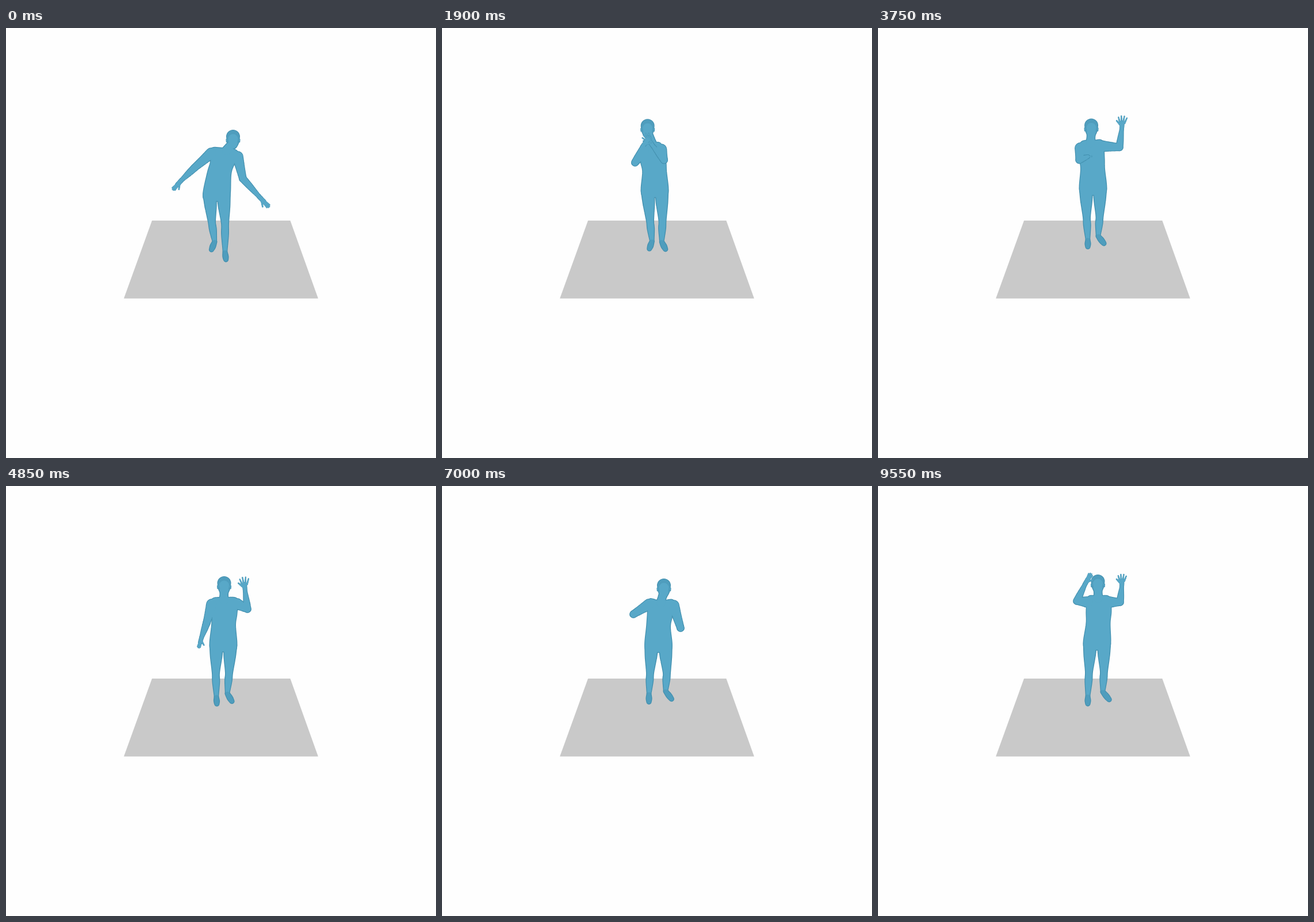
Write an HTML page with a canvas that moves like this. It is 748 px wide and 748 px high and loops after 9600 ms.

```html
<!DOCTYPE html>
<html lang="en">
<head>
<meta charset="utf-8">
<title>Moving figure</title>
<style>
  html, body { margin: 0; width: 100%; height: 100%; overflow: hidden; background: #fefefe; }
  canvas { display: block; }
</style>
</head>
<body>
<canvas id="stage" width="748" height="748"></canvas>
<script>
const ctx = document.getElementById('stage').getContext('2d');
const LOOP = 9600, STEP = 50;
const SKIN = '#58a8c8', MID = '#4f9dbd', RIM = '#428fae';

// Every joint has its own track of [time, x, y]; L and R are screen sides.
const tracks = {};
function pose(time, joints) {
  for (const name in joints) (tracks[name] ||= []).push([time, ...joints[name]]);
}

pose(0, {
  head: [395, 193], neck: [384, 210], chest: [377.5, 232], waist: [371, 252], hip: [366.5, 288],
  shL: [357, 218], elL: [328, 243], wrL: [305, 265], tipL: [290, 282],
  shR: [403, 224], elR: [412, 262], wrR: [441, 294], tipR: [458, 312],
  knL: [358, 337], anL: [363, 372], toeL: [356, 389],
  knR: [381, 340], anR: [381, 390], toeR: [383, 406]
});
pose(1100, {
  head: [366, 178], neck: [371, 202], chest: [371, 232], waist: [371, 252], hip: [370.5, 284],
  shL: [357, 217], elL: [327, 238], wrL: [338, 213], tipL: [349, 195],
  shR: [384, 217], elR: [384, 243], wrR: [347, 222], tipR: [326, 216],
  knL: [363, 340], anL: [370, 373], toeL: [355, 390],
  knR: [384, 340], anR: [385, 384], toeR: [383, 402]
});
pose(1500, {
  elL: [324, 234], wrL: [332, 208], tipL: [338, 187],
  elR: [376, 239], wrR: [334, 217], tipR: [313, 209]
});
pose(2000, {
  head: [357, 174], hip: [370, 281],
  elL: [338, 234], wrL: [352, 206], tipL: [367, 188],
  elR: [388, 228], wrR: [372, 202], tipR: [359, 180],
  anL: [365, 371], toeL: [360, 387], anR: [382, 371], toeR: [391, 387]
});
pose(2650, {
  head: [355, 175], neck: [361, 198], chest: [364, 229], waist: [368.5, 248], hip: [370, 280],
  shL: [346, 212], elL: [350, 222], wrL: [380, 188], tipL: [404, 175],
  shR: [379, 206], elR: [410, 202], wrR: [414, 170], tipR: [412, 146],
  knL: [361, 332], anL: [364, 370], toeL: [363, 385],
  knR: [383, 330], anR: [381, 363], toeR: [396, 378]
});
pose(3400, {
  head: [366, 174],
  elL: [351, 224], wrL: [382, 196], tipL: [402, 182],
  elR: [420, 204], wrR: [426, 173], tipR: [429, 149]
});
pose(4200, {
  head: [378, 173],
  elL: [349, 237], wrL: [341, 262], tipL: [333, 280],
  elR: [420, 212], wrR: [421, 181], tipR: [422, 157]
});
pose(4850, {
  head: [379.5, 173], neck: [379, 195], chest: [380, 222], waist: [378.5, 242], hip: [378, 275],
  shL: [358, 206], elL: [349, 238], wrL: [340, 264], tipL: [335, 282],
  shR: [402, 205], elR: [420, 214], wrR: [416, 183], tipR: [414, 158],
  knL: [365, 325], anL: [366, 367], toeL: [367, 382],
  knR: [388, 325], anR: [385, 361], toeR: [395, 378]
});
pose(5600, { elR: [423, 214], wrR: [430, 186], tipR: [439, 164] });
pose(6300, {
  elL: [347, 237], wrL: [340, 262], tipL: [336, 279],
  elR: [424, 220], wrR: [430, 194], tipR: [437, 172]
});
pose(7000, {
  head: [386, 177], neck: [381, 200], chest: [379, 225], waist: [376.5, 245], hip: [376.5, 276],
  shL: [360, 206], elL: [333, 223], wrL: [345, 215], tipL: [349, 212],
  shR: [403, 208], elR: [415, 247], wrR: [411, 236], tipR: [409, 232],
  knL: [362, 325], anL: [360, 362], toeL: [360, 379],
  knR: [391, 325], anR: [389, 357], toeR: [402, 374]
});
pose(7700, { elR: [426, 228], wrR: [430, 206], tipR: [434, 188] });
pose(8400, {
  head: [385, 170], neck: [381, 195], chest: [381, 224], waist: [379.5, 244], hip: [379, 272],
  shL: [369, 205], elL: [378, 211], wrL: [410, 183], tipL: [424, 162],
  shR: [396, 202], elR: [432, 214], wrR: [436, 191], tipR: [442, 168],
  knL: [366, 325], anL: [363, 364], toeL: [364, 382],
  knR: [394, 322], anR: [389, 356], toeR: [404, 371]
});
pose(9020, {
  elL: [361, 199], wrL: [383, 158], tipL: [394, 130],
  elR: [431, 201], wrR: [438, 160], tipR: [444, 134]
});
pose(9550, {
  head: [382.5, 170], neck: [383, 192], chest: [384, 217], waist: [383, 239], hip: [381, 272],
  shL: [365, 202], elL: [346, 200], wrL: [360, 171], tipL: [371, 152],
  shR: [403, 202], elR: [421, 202], wrR: [424, 176], tipR: [425, 153],
  knL: [367, 323], anL: [365, 366], toeL: [365, 382],
  knR: [393, 322], anR: [391, 358], toeR: [405, 375]
});

const mix = (a, b, k) => a.map((v, i) => v + (b[i] - v) * k);

function jointAt(track, t) {
  let i = 1;
  while (i < track.length - 1 && track[i][0] < t) i++;
  const a = track[i - 1], b = track[i];
  const u = Math.min(1, (t - a[0]) / (b[0] - a[0]));
  const k = (u + u * u * (3 - 2 * u)) / 2;
  return mix(a, b, k).slice(1);
}

function spline(a, b, c, d, u) {
  return b.map((v, i) => v + u / 2 * (c[i] - a[i] +
    u * (2 * a[i] - 5 * v + 4 * c[i] - d[i] + u * (3 * (v - c[i]) + d[i] - a[i]))));
}

// Fleshes out a chain of [x, y, radius].
function limb(pts, color, inset) {
  const N = 14;
  ctx.fillStyle = color;
  ctx.beginPath();
  for (let i = 0; i < pts.length - 1; i++) {
    const a = pts[i - 1] || pts[i], d = pts[i + 2] || pts[i + 1];
    for (let j = 0; j <= N; j++) {
      const [x, y, r] = spline(a, pts[i], pts[i + 1], d, j / N);
      const size = Math.max(0.3, r - inset);
      ctx.moveTo(x + size, y);
      ctx.arc(x, y, size, 0, 7);
    }
  }
  ctx.fill();
}

function blob(pts, color, outline) {
  const n = pts.length;
  ctx.beginPath();
  pts.forEach((p, i) => {
    for (let j = 0; j < 8; j++) {
      ctx.lineTo(...spline(pts[(i + n - 1) % n], p, pts[(i + 1) % n], pts[(i + 2) % n], j / 8));
    }
  });
  ctx.closePath();
  ctx.fillStyle = ctx.strokeStyle = color;
  ctx.fill();
  if (outline) {
    ctx.lineWidth = 2.4;
    ctx.stroke();
  }
}

const upperArm = (p, s) => [
  [...p['sh' + s], 10], [...mix(p['sh' + s], p['el' + s], 0.5), 8.2], [...p['el' + s], 6.8]
];
const foreArm = (p, s) => [
  [...p['el' + s], 6.8], [...mix(p['el' + s], p['wr' + s], 0.4), 6], [...p['wr' + s], 3.9]
];

function leg(p, s) {
  const side = s === 'L' ? -1 : 1;
  const top = [p.hip[0] + 12 * side, p.hip[1] + 2];
  const knee = p['kn' + s], ankle = p['an' + s];
  return [
    [...top, 12.3], [...mix(top, knee, 0.45), 10.6], [...knee, 7.1],
    [...mix(knee, ankle, 0.4), 6.9], [...ankle, 4.2]
  ];
}

function foot(p, s) {
  const a = p['an' + s], b = p['toe' + s];
  return [[...a, 4.5], [...mix(a, b, 0.45), 5.6], [...mix(a, b, 0.8), 4.6]];
}

function hand(p, s, color, inset) {
  const [x, y] = p['wr' + s], [tx, ty] = p['tip' + s];
  const len = Math.hypot(tx - x, ty - y), size = Math.min(1, len / 20);
  const dir = Math.atan2(ty - y, tx - x);
  const at = (angle, k) => [x + Math.cos(dir + angle) * len * k, y + Math.sin(dir + angle) * len * k];
  // A raised hand opens its fingers; the thumb swaps sides as the hand drops.
  const up = (y - ty) / len, open = Math.max(0, up);
  const spread = 0.1 + open * (s === 'L' ? 0.03 : 0.13);
  const thumb = s === 'L' ? up : -up;
  limb([[x, y, 3.9], [...at(0, 0.25), 4.2 * size], [...at(0, 0.48), 4 * size]], color, inset);
  for (let i = 0; i < 4; i++) {
    const f = i - 1.5;
    limb([[...at(f * spread, 0.5), 1.7 * size], [...at(f * spread, 1 - Math.abs(f) * 0.07), 1.2 * size]],
      color, inset * 0.3);
  }
  limb([[...at(0.3 * thumb, 0.3), 2.1 * size], [...at(0.62 * thumb, 0.72), 1.3 * size]], color, inset * 0.3);
}

function torso({ neck, shL, shR, chest, waist, hip }) {
  const [nx, ny] = neck, [cx, cy] = chest, [wx, wy] = waist, [hx, hy] = hip;
  return [
    [nx - 6.5, ny - 1], [shL[0], shL[1] - 8], [cx - 21.3, cy], [wx - 20.3, wy],
    [hx - 23.2, hy], [hx - 19, hy + 12], [hx, hy + 13], [hx + 19, hy + 12],
    [hx + 23.2, hy], [wx + 20.3, wy], [cx + 21.3, cy], [shR[0], shR[1] - 8], [nx + 6.5, ny - 1]
  ];
}

function head({ head: [x, y], neck }, color, inset) {
  limb([[x, y + 8, 8.5], [...mix([x, y + 8], neck, 0.6), 7.8], [neck[0], neck[1] + 3, 9]], color, inset);
  for (const ear of [x - 11, x + 11]) limb([[ear, y + 1, 1.6], [ear, y + 5, 1.3]], color, inset * 0.5);
  limb([[x, y - 4, 12], [x, y + 3, 11], [x, y + 10, 8]], color, inset);
}

function figure(p) {
  for (const [color, inset] of [[RIM, 0], [SKIN, 1.3]]) {
    for (const s of ['R', 'L']) {
      limb(leg(p, s), color, inset);
      limb(foot(p, s), inset ? MID : color, inset);
    }
    blob(torso(p), color, !inset);
    head(p, color, inset);
    for (const s of ['R', 'L']) limb(upperArm(p, s), color, inset);
  }
  // Scalp and face
  const [x, y] = p.head;
  limb([[x, y - 4, 11], [x, y, 10.5]], MID, 0);
  limb([[x, y, 8.5], [x, y + 8, 7]], SKIN, 0);
  for (const s of ['R', 'L']) {
    limb(foreArm(p, s), RIM, 0);
    hand(p, s, RIM, 0);
    limb(foreArm(p, s), SKIN, 1.1);
    hand(p, s, SKIN, 0.9);
    limb(upperArm(p, s), SKIN, 1.3);
  }
}

function floor() {
  ctx.fillStyle = '#c9c9c9';
  ctx.beginPath();
  ctx.moveTo(254, 335);
  ctx.lineTo(494.5, 335);
  ctx.lineTo(543, 470.5);
  ctx.lineTo(205, 470.5);
  ctx.fill();
}

function draw(now) {
  const t = Math.floor(now % LOOP / STEP) * STEP;
  const p = {};
  for (const name in tracks) p[name] = jointAt(tracks[name], t);
  ctx.fillStyle = '#fefefe';
  ctx.fillRect(0, 0, 748, 748);
  floor();
  figure(p);
}

const start = performance.now();
function tick() {
  draw(performance.now() - start);
  requestAnimationFrame(tick);
}
tick();
</script>
</body>
</html>
```
